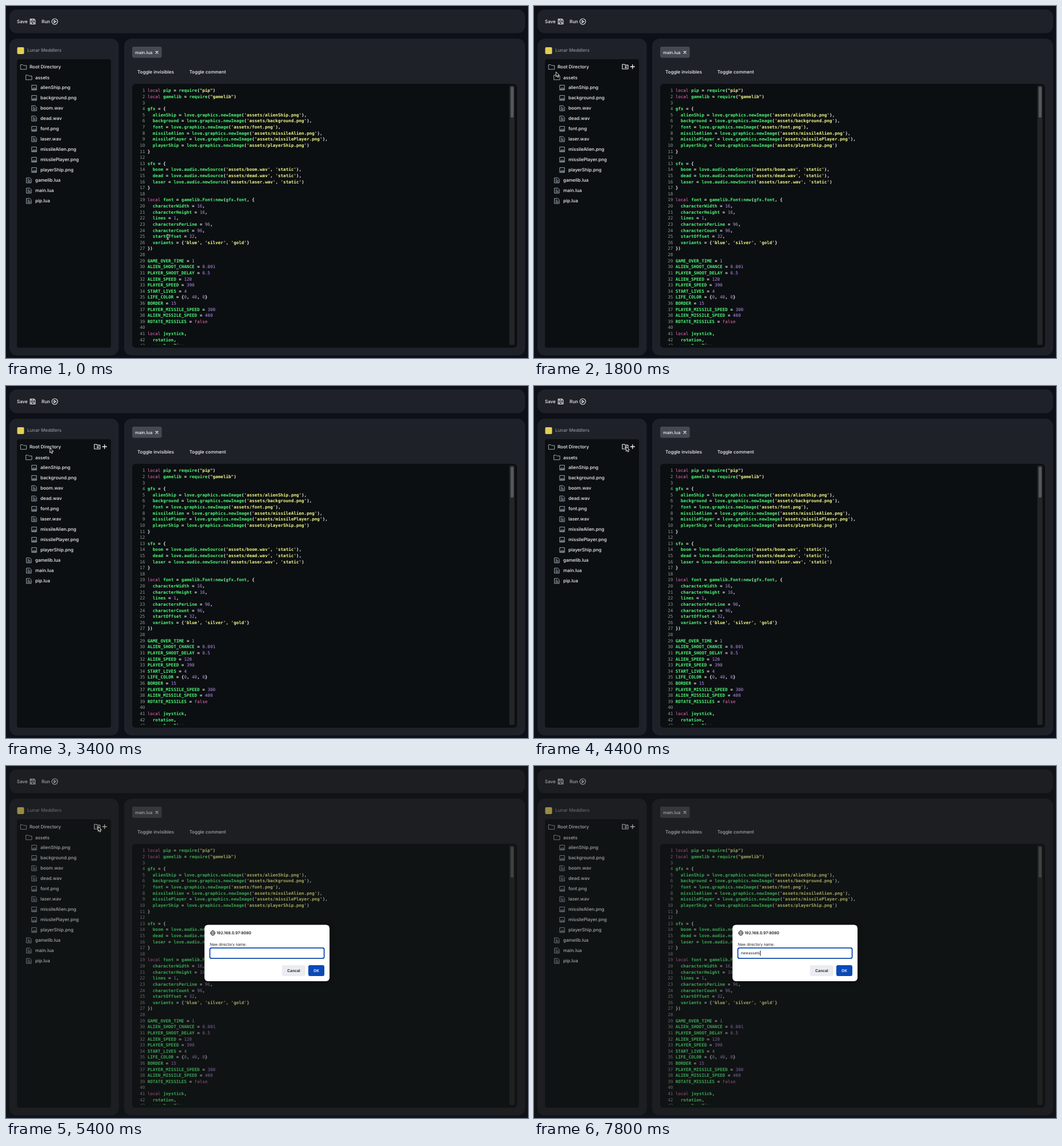
These frames come from a looping animation (910 px wide and 615 px high, 8000 ms). An HTML page with a canvas:

```html
<!DOCTYPE html>
<html lang="en">
<head>
<meta charset="utf-8">
<title>Code editor</title>
<style>
html, body { margin: 0; width: 100%; height: 100%; overflow: hidden; background: #0d1018; }
canvas { display: block; width: 910px; height: 615px; }
</style>
</head>
<body>
<canvas id="stage"></canvas>
<script>
const W = 910, H = 615, LOOP = 8000, STEP = 200;
const canvas = document.getElementById('stage');
const ratio = window.devicePixelRatio || 1;
canvas.width = W * ratio;
canvas.height = H * ratio;
const ctx = canvas.getContext('2d');
ctx.scale(ratio, ratio);

const UI = 'Inter, sans-serif';
const MONO = '"DejaVu Sans Mono", monospace';
const CODE_SIZE = 7.56, CHAR = CODE_SIZE * 0.602, LINE = 10.62;
const COLORS = {
  plain: '#f0f1ec', name: '#4df578', string: '#f1f78a', number: '#b78ff0', keyword: '#ee6fba'
};

const CODE = `local pip = require("pip")
local gamelib = require("gamelib")

gfx = {
  alienShip = love.graphics.newImage('assets/alienShip.png'),
  background = love.graphics.newImage('assets/background.png'),
  font = love.graphics.newImage('assets/font.png'),
  missileAlien = love.graphics.newImage('assets/missileAlien.png'),
  missilePlayer = love.graphics.newImage('assets/missilePlayer.png'),
  playerShip = love.graphics.newImage('assets/playerShip.png')
}

sfx = {
  boom = love.audio.newSource('assets/boom.wav', 'static'),
  dead = love.audio.newSource('assets/dead.wav', 'static'),
  laser = love.audio.newSource('assets/laser.wav', 'static')
}

local font = gamelib.Font:new(gfx.font, {
  characterWidth = 16,
  characterHeight = 16,
  lines = 1,
  charactersPerLine = 96,
  characterCount = 96,
  startOffset = 32,
  variants = {'blue', 'silver', 'gold'}
})

GAME_OVER_TIME = 1
ALIEN_SHOOT_CHANCE = 0.001
PLAYER_SHOOT_DELAY = 0.5
ALIEN_SPEED = 120
PLAYER_SPEED = 390
START_LIVES = 4
LIFE_COLOR = {0, 40, 0}
BORDER = 15
PLAYER_MISSILE_SPEED = 300
ALIEN_MISSILE_SPEED = 400
ROTATE_MISSILES = false

local joystick,
  rotation,
  gameOverTime,`.split('\n');

const ASSETS = ['alienShip.png', 'background.png', 'boom.wav', 'dead.wav', 'font.png',
  'laser.wav', 'missileAlien.png', 'missilePlayer.png', 'playerShip.png'];
const SCRIPTS = ['gamelib.lua', 'main.lua', 'pip.lua'];
const rowY = i => 106.6 + 18 * i;

function box(x, y, w, h, r, fill) {
  ctx.beginPath();
  ctx.roundRect(x, y, w, h, r);
  ctx.fillStyle = fill;
  ctx.fill();
}

function text(str, x, y, color, size = 8, weight = 500, align = 'left') {
  ctx.font = `${weight} ${size}px ${UI}`;
  ctx.textAlign = align;
  ctx.fillStyle = color;
  ctx.fillText(str, x, y + size * 0.36);
}

// Strokes an SVG path centred on x, y.
function icon(path, x, y, color, width = 1) {
  ctx.save();
  ctx.translate(x, y);
  ctx.strokeStyle = color;
  ctx.lineWidth = width;
  ctx.lineJoin = ctx.lineCap = 'round';
  ctx.stroke(new Path2D(path));
  ctx.restore();
}

const FOLDER = 'M-5-4H-1.5L0-2.6H5V4H-5Z';
const IMAGE = 'M-4-4.2H4V4.2H-4ZM-3 2.5L-1 .2L.3 1.5L1.6.2L3.2 2.5Z';
const DOC = 'M-4-4.4H1.5L4-2V4.4H-4ZM-2-1.6H0M-2 .4H2M-2 2.4H2';
const PLUS = 'M-3.6 0H3.6M0-3.6V3.6';
const NEW_FOLDER = FOLDER + 'M-.8.8H3M1.1-1V2.6';
const PENCIL = 'M-4 4L-3.4 1.5L2.3-4.2L4.2-2.3L-1.5 3.4ZM1-3L3-1';
const TRASH = 'M-3.4-3.2H3.4M-1.2-3.2V-4.4H1.2V-3.2M-2.7-3V4.4H2.7V-3';
const FLOPPY = 'M-4.3-4.3H2.6L4.3-2.6V4.3H-4.3ZM-2.4-4V-1.5H1.7V-4M-2.2 4V1H2.2V4';
const RUN = 'M-5 0A5 5 0 1 1 5 0A5 5 0 1 1-5 0M-1.3-2.2L2.2 0L-1.3 2.2Z';
const CROSS = 'M-2-2L2 2M2-2L-2 2';
const GLOBE = 'M-4 0A4 4 0 1 1 4 0A4 4 0 1 1-4 0M-4 0H4M0-4C-2.4-2-2.4 2 0 4C2.4 2 2.4-2 0-4';

function drawTree(hover) {
  const line = '#9aa7b4', white = '#f3f4f6';
  box(19, 93, 164, 504, 4, '#0c0f11');
  icon(FOLDER, 30.7, rowY(0), line);
  text('Root Directory', 41, rowY(0), white);
  icon(FOLDER, 40, rowY(1) + .2, line);
  text('assets', 51, rowY(1) + .2, white);
  ASSETS.forEach((name, i) => {
    const y = rowY(i + 2);
    icon(name.endsWith('png') ? IMAGE : DOC, 49.2, y, line);
    text(name, 60, y - .2, white);
  });
  SCRIPTS.forEach((name, i) => {
    const y = rowY(i + 11);
    icon(DOC, 40, y, line);
    text(name, 51, y - .2, white);
  });
  if (hover === 'assets') {
    icon(NEW_FOLDER, 133.2, 123.8, white, 1.1);
    icon(PLUS, 146, 123.8, white, 1.3);
    icon(PENCIL, 158.8, 123.8, white, 1.1);
    icon(TRASH, 171.8, 123.8, '#c9252d', 1.1);
  } else if (hover === 'root') {
    icon(NEW_FOLDER, 159, 106, white, 1.1);
    icon(PLUS, 171.8, 106, white, 1.3);
  }
}

function tokenKind(token) {
  if (/^['"]/.test(token)) return 'string';
  if (/^\d/.test(token)) return 'number';
  if (/^(local|false)$/.test(token)) return 'keyword';
  return /^\w/.test(token) ? 'name' : 'plain';
}

function drawCode() {
  box(220, 136, 671, 461, 6, '#0c0f11');
  box(877.5, 139, 9, 453, 0, '#232527');
  box(879.5, 141, 5.5, 54, 2, '#55575a');
  ctx.save();
  ctx.beginPath();
  ctx.rect(220, 138, 657, 454);
  ctx.clip();
  CODE.forEach((source, i) => {
    const y = 150.3 + LINE * i;
    ctx.font = `${CODE_SIZE}px ${MONO}`;
    ctx.textAlign = 'right';
    ctx.fillStyle = '#949b98';
    ctx.fillText(i + 1, 242.3, y);
    ctx.textAlign = 'left';
    for (const match of source.matchAll(/'[^']*'|"[^"]*"|\d[\d.]*|\w+|[^\s\w'"]+/g)) {
      const kind = tokenKind(match[0]);
      const light = kind === 'number' || kind === 'keyword';
      ctx.font = `${light ? 'normal' : 'bold'} ${CODE_SIZE}px ${MONO}`;
      ctx.fillStyle = COLORS[kind];
      ctx.fillText(match[0], 246.7 + match.index * CHAR, y);
    }
  });
  ctx.restore();
}

function drawEditor(hover) {
  const panel = '#1f2129', white = '#f3f4f6';
  ctx.fillStyle = '#0d1018';
  ctx.fillRect(0, 0, W, H);
  box(6, 6, 899, 41.5, 13, panel);
  box(6, 57, 190.5, 553.5, 13, panel);
  box(206, 57, 699, 553.5, 13, panel);

  text('Save', 19, 27, white);
  icon(FLOPPY, 46.5, 27.2, white, 1.1);
  text('Run', 62, 27, white);
  icon(RUN, 85, 27.2, white, 1.1);

  box(19.5, 72, 12, 12, 2, '#e3cf55');
  text('Lunar Meddlers', 37, 77.2, '#8d9098');

  box(220, 71, 51.5, 19.5, 3, '#464852');
  text('main.lua', 225, 80.8, white, 7.5);
  icon(CROSS, 263, 81, white, 1.1);
  text('Toggle invisibles', 229, 115, white);
  text('Toggle comment', 319.5, 115, white);

  drawTree(hover);
  drawCode();
}

function drawDialog(typed, caret) {
  ctx.fillStyle = 'rgba(23, 25, 23, 0.36)';
  ctx.fillRect(0, 0, W, H);
  ctx.save();
  ctx.shadowColor = 'rgba(0, 0, 0, 0.5)';
  ctx.shadowBlur = 8 * ratio;
  box(346, 277.5, 218, 98.5, 6, '#fff');
  ctx.restore();

  icon(GLOBE, 360.5, 291.8, '#222', .9);
  text('192.168.0.97:8080', 367, 291.7, '#1b1c1f', 6.8, 600);
  text('New directory name:', 355.3, 311.3, '#1b1c1f', 6.5, 400);

  box(354.5, 317, 201, 20, 3.5, '#0b49ae');
  box(356.3, 318.8, 197.4, 16.4, 2, '#fff');
  text(typed, 360.7, 327, '#1b1c1f', 6.6, 400);
  if (caret) {
    ctx.fillStyle = '#111';
    ctx.fillRect(360.9 + ctx.measureText(typed).width, 322.5, .9, 9);
  }

  box(481, 348, 41, 19, 3, '#ebecf1');
  text('Cancel', 501.6, 357.5, '#1b1c1f', 6.7, 600, 'center');
  box(527, 348, 28, 19, 3, '#0b49b6');
  text('OK', 541, 357.5, '#fff', 6.7, 600, 'center');
}

// Pointer stops: time, x, y; motion between them is eased.
const STOPS = [[0, 282, 403.5], [200, 282, 403.5], [1000, 59, 130.5], [1400, 59, 130.5],
  [2000, 31, 109.5], [3000, 31, 109.5], [4000, 160.5, 105.5]];

function pointerAt(t) {
  const next = STOPS.findIndex(stop => stop[0] > t);
  if (next < 0) return STOPS[STOPS.length - 1].slice(1);
  const [t0, x0, y0] = STOPS[next - 1], [t1, x1, y1] = STOPS[next];
  const u = (t - t0) / (t1 - t0), k = u * u * (3 - 2 * u);
  return [x0 + (x1 - x0) * k, y0 + (y1 - y0) * k];
}

function drawPointer(x, y, beam) {
  if (beam) {
    const path = 'M-1.8-4.4Q0-4.4 0-3.2Q0-4.4 1.8-4.4M0-3.2V3.2M-1.8 4.4Q0 4.4 0 3.2Q0 4.4 1.8 4.4M-1.2 1.2H1.2';
    icon(path, x, y, '#111', 2);
    icon(path, x, y, '#e8e8e8', .9);
    return;
  }
  const arrow = new Path2D('M0 0V8.6L1.9 6.8L3.2 9.8L4.7 9.1L3.4 6.2H6Z');
  ctx.save();
  ctx.translate(x, y);
  ctx.fillStyle = '#0a0a0a';
  ctx.fill(arrow);
  ctx.strokeStyle = '#f2f2f2';
  ctx.lineWidth = .9;
  ctx.stroke(arrow);
  ctx.restore();
}

function hoverAt(x, y) {
  if (x > 183) return '';
  if (y >= 98 && y < 116) return 'root';
  return y >= 116 && y < 134 ? 'assets' : '';
}

function render(t) {
  const [x, y] = pointerAt(t);
  ctx.textRendering = 'geometricPrecision';
  drawEditor(hoverAt(x, y));
  if (t >= 4600) {
    const count = Math.max(0, Math.floor((t - 6000) / STEP));
    const caret = count > 0 || (t - 4600) % 1000 < 500;
    drawDialog('newassets'.slice(0, count), caret);
  }
  if (t < 6200) drawPointer(x, y, t < 1600);
}

let shown = -1;
const start = performance.now();
function tick() {
  const elapsed = Math.max(0, performance.now() - start) % LOOP;
  const t = Math.floor(elapsed / STEP) * STEP;
  if (t !== shown) render(shown = t);
  requestAnimationFrame(tick);
}
tick();
</script>
</body>
</html>
```
